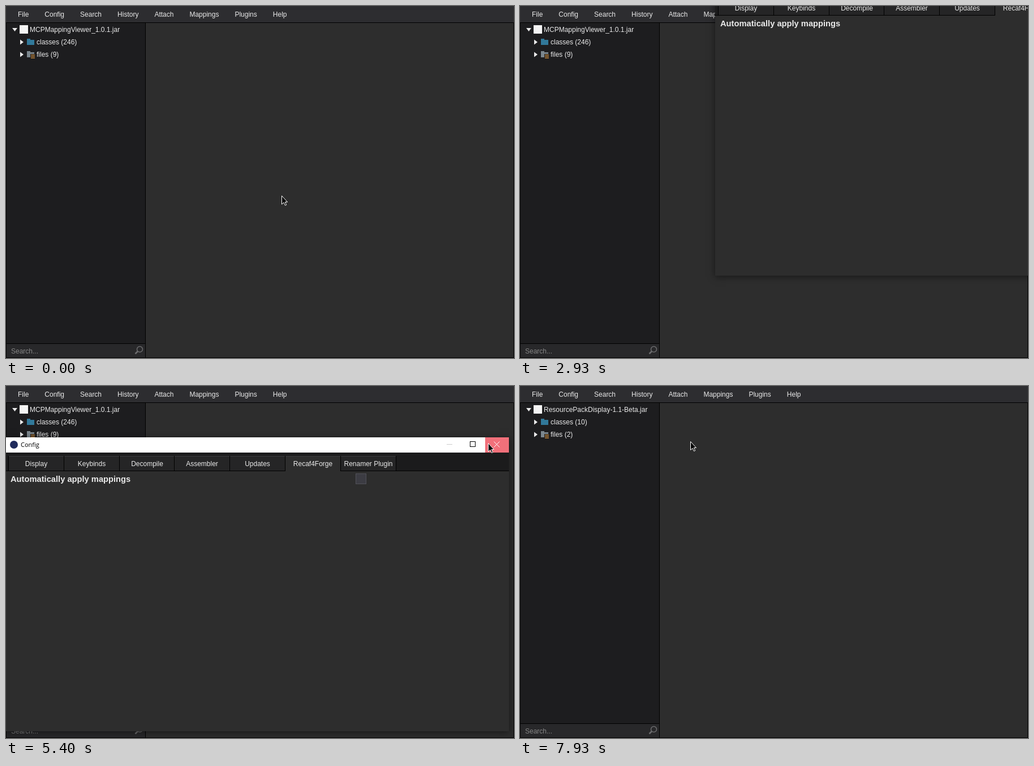
An HTML page with a canvas for the animation above (8 s loop, 898 px wide and 624 px high).

```html
<!DOCTYPE html>
<html lang="en">
<head>
<meta charset="utf-8">
<title>Jar viewer</title>
<style>
  html, body { margin: 0; width: 100%; height: 100%; overflow: hidden; background: #2d2d2d; }
  canvas { display: block; }
</style>
</head>
<body>
<canvas id="stage" width="898" height="624"></canvas>
<script>
const ctx = document.getElementById('stage').getContext('2d', { alpha: false });
const LOOP = 8000, STEP = 200 / 3, ROW = 24;
const SANS = '"Liberation Sans", Arial, sans-serif';
const INK = '#eaeaea', PANEL = '#2d2d2d', DARK = '#1b1b1c', HOVER = '#3a3a3d';

const menus = ['File', 'Config', 'Search', 'History', 'Attach', 'Mappings', 'Plugins', 'Help'];
const fileItems = ['Load', 'Load recent', 'Add library', 'Export program', 'Export workspace'];
const recentItems = ['MCPMappingViewer_1.0.1.jar', 'ResourcePackDisplay-1.1-Beta.jar', 'sample-1.0.jar',
  'example-plugin-1.2.jar', 'test-library-2.0.jar', 'demo-all.jar'];
const tabs = ['Display', 'Keybinds', 'Decompile', 'Assembler', 'Updates', 'Recaf4Forge', 'Renamer Plugin'];

const point = (x, y) => ({ x, y });
const centre = point(488, 337), fileMenu = point(26, 8), loadRecent = point(76, 70),
  titleBar = point(460, 104), windowStart = point(346, -134);

// The pointer rests between moves
const moves = [
  { from: 0, to: 670, at: point(38, 28) },
  { from: 1530, to: 1730, at: fileMenu },
  { from: 1800, to: 2000, at: loadRecent },
  { from: 2070, to: 2270, at: point(68, 12) },
  { from: 2470, to: 2870, at: point(titleBar.x + windowStart.x, titleBar.y + windowStart.y) },
  { from: 3330, to: 3930, at: titleBar },
  { from: 3930, to: 4270, at: point(561, 188) },
  { from: 4270, to: 4530, at: point(627, 165) },
  { from: 4600, to: 5270, at: point(853, 102) },
  { from: 5530, to: 5870, at: fileMenu },
  { from: 6400, to: 6730, at: loadRecent },
  { from: 6800, to: 7130, at: point(290, 77) },
  { from: 7270, to: 7470, at: point(302, 99) }
];

const smooth = u => u * u * (3 - 2 * u);
const clamp = u => Math.max(0, Math.min(1, u));
const within = (t, from, to) => t >= from && t < to;

function pointerAt(t) {
  let { x, y } = centre;
  for (const { from, to, at } of moves) {
    const u = smooth(clamp((t - from) / (to - from)));
    x += (at.x - x) * u;
    y += (at.y - y) * u;
  }
  return point(Math.round(x), Math.round(y));
}

function box(x, y, w, h, color) {
  ctx.fillStyle = color;
  ctx.fillRect(x, y, w, h);
}

function shadowBox(x, y, w, h, color, blur, alpha) {
  ctx.save();
  ctx.shadowColor = `rgba(0,0,0,${alpha})`;
  ctx.shadowBlur = blur;
  ctx.shadowOffsetY = 2;
  box(x, y, w, h, color);
  ctx.restore();
}

function text(str, x, middle, { color = INK, font = '12px ' + SANS, align = 'left', drop = 4 } = {}) {
  ctx.font = font;
  ctx.fillStyle = color;
  ctx.textAlign = align;
  ctx.fillText(str, x, middle + drop);
  return ctx.measureText(str).width;
}

function shape(points, fill, stroke) {
  ctx.beginPath();
  points.forEach(([x, y]) => ctx.lineTo(x, y));
  ctx.closePath();
  ctx.fillStyle = fill;
  ctx.fill();
  if (!stroke) return;
  ctx.strokeStyle = stroke;
  ctx.lineWidth = 1;
  ctx.stroke();
}

function line(color, width, ...points) {
  ctx.beginPath();
  points.forEach(([x, y]) => ctx.lineTo(x, y));
  ctx.strokeStyle = color;
  ctx.lineWidth = width;
  ctx.stroke();
}

function circle(x, y, r) {
  ctx.beginPath();
  ctx.arc(x, y, r, 0, 2 * Math.PI);
}

const rightArrow = (x, y, w, h) => shape([[x, y - h], [x + w, y], [x, y + h]], INK);

function branch(label, y, color) {
  rightArrow(25, y, 6, 4.5);
  box(37, y - 6, 6, 4, color);
  box(37, y - 4, 13, 9, color);
  text(label, 54, y);
}

function drawMain(t) {
  const loaded = t >= 7930;
  box(0, 0, 898, 624, PANEL);
  box(0, 0, 898, 29, '#2d2d30');
  box(0, 29, 246, 595, '#1d1d1f');
  box(1, 599, 245, 24, '#28282a');
  for (const x of [0, 246, 897]) box(x, 29, 1, 595, '#000');
  box(0, 29, 898, 1, '#000');
  box(0, 598, 246, 1, '#000');
  box(0, 623, 898, 1, '#000');

  ctx.globalAlpha = within(t, 7870, 7930) ? 0.4 : 1;
  if (within(t, 1670, 2200) || within(t, 6000, 7870)) {
    box(7, 0, 47, 29, '#000');
    box(8, 0, 45, 28, DARK);
  }
  menus.reduce((x, label) => x + text(label, x, 15) + 28, 21);

  shape([[11, 39], [20, 39], [15.5, 45]], INK);
  box(24, 34, 15, 15, '#f4f4f4');
  text(recentItems[loaded ? 1 : 0], 42, 42);
  branch(`classes (${loaded ? 10 : 246})`, 64, '#31799a');
  branch(`files (${loaded ? 2 : 9})`, 86, '#7c878e');
  box(43, 85, 8, 9, '#1d1d1f');
  for (let y = 86; y < 94; y += 2) box(44, y, 7, 1, '#c98a3c');

  text('Search...', 9, 611, { color: '#868686', drop: 5 });
  circle(236.5, 608.5, 5);
  ctx.strokeStyle = '#6c6c6e';
  ctx.lineWidth = 1.5;
  ctx.stroke();
  line('#6c6c6e', 2.5, [233, 612], [228.5, 616.5]);
  ctx.globalAlpha = 1;
}

function drawMenu(items, x, y, w, active, inset) {
  const h = items.length * ROW + 10;
  shadowBox(x, y, w, h + 1, '#000', 4, 0.35);
  box(x + 1, y + 1, w - 2, h - 1, DARK);
  items.forEach((label, i) => {
    const top = y + 5 + i * ROW;
    if (i === active) box(x + 1, top, w - 2, ROW, HOVER);
    text(label, x + inset, top + ROW / 2, { drop: 5 });
  });
}

function drawMenus(t, pointer) {
  if (!within(t, 1730, 2200) && !within(t, 6130, 7870)) return;
  const rowUnder = top => Math.floor((pointer.y - top) / ROW);
  const sub = within(t, 2000, 2140) || within(t, 6670, 7870);
  drawMenu(fileItems, 8, 28, 139, sub ? 1 : rowUnder(33), 12);
  rightArrow(130, 69.5, 4, 3.5);
  if (!sub) return;
  drawMenu(recentItems, 146, 57, 239, t >= 7330 ? rowUnder(62) : -1, 32);
  recentItems.forEach((_, i) => box(158, 67 + i * ROW, 14, 14, '#f4f4f4'));
}

function drawConfig(t, pointer) {
  if (!within(t, 2600, 5530)) return;
  const left = t <= 3330 ? windowStart.x : t < 3930 ? pointer.x - titleBar.x : 0;
  const top = t <= 3330 ? windowStart.y : t < 3930 ? pointer.y - titleBar.y : 0;
  ctx.save();
  ctx.globalAlpha = clamp((t - 2530) / 270);
  ctx.translate(left, top);
  shadowBox(-1, 91, 890, 521, PANEL, 12, 0.5);

  box(-1, 91, 890, 28, '#fff');
  circle(14, 104, 7);
  ctx.fillStyle = '#202b5c';
  ctx.fill();
  text('Config', 26, 104, { color: '#000', font: '11px "Open Sans", "Noto Sans", sans-serif' });
  const hot = t >= 5230, cross = hot ? '#fff' : '#000';
  if (hot) box(847, 91, 42, 27, t >= 5400 ? '#f1707a' : '#e81123');
  box(779, 103, 10, 1, '#ccc');
  ctx.strokeStyle = '#000';
  ctx.lineWidth = 1;
  ctx.strokeRect(820.5, 98.5, 9, 9);
  line(cross, 1, [862.5, 98.5], [872.5, 108.5]);
  line(cross, 1, [872.5, 98.5], [862.5, 108.5]);

  box(-1, 118, 890, 32, DARK);
  box(-1, 150, 890, 1, '#000');
  tabs.forEach((label, i) => {
    const x = Math.round(4 + i * 97.8), selected = label === 'Recaf4Forge';
    box(x, 124, 99, 26, '#000');
    box(x + 1, 124, 97, selected ? 27 : 26, selected ? PANEL : '#252526');
    box(x + 1, 124, 97, 1, '#3c3c3e');
    text(label, x + 49.5, 138, { align: 'center' });
  });

  text('Automatically apply mappings', 8, 164, { font: 'bold 14.7px ' + SANS, drop: 5.5 });
  box(618, 155, 19, 19, '#515158');
  box(619, 156, 17, 17, '#3c3c43');
  ctx.restore();
}

function drawPointer({ x, y }) {
  const outline = [[0, 0], [0, 15], [3.5, 11.8], [6, 17], [8.2, 16], [5.8, 11], [10, 11]];
  shape(outline.map(([dx, dy]) => [x + dx - 0.5, y + dy - 0.5]), '#000', '#fff');
}

const start = performance.now();
function frame() {
  const elapsed = (performance.now() - start) % LOOP;
  // The picture advances fifteen times a second
  const t = Math.round(Math.floor((elapsed + 4) / STEP) * STEP / 10) * 10 % LOOP;
  const pointer = pointerAt(t);
  drawMain(t);
  drawMenus(t, pointer);
  drawConfig(t, pointer);
  drawPointer(pointer);
  requestAnimationFrame(frame);
}
frame();
</script>
</body>
</html>
```
